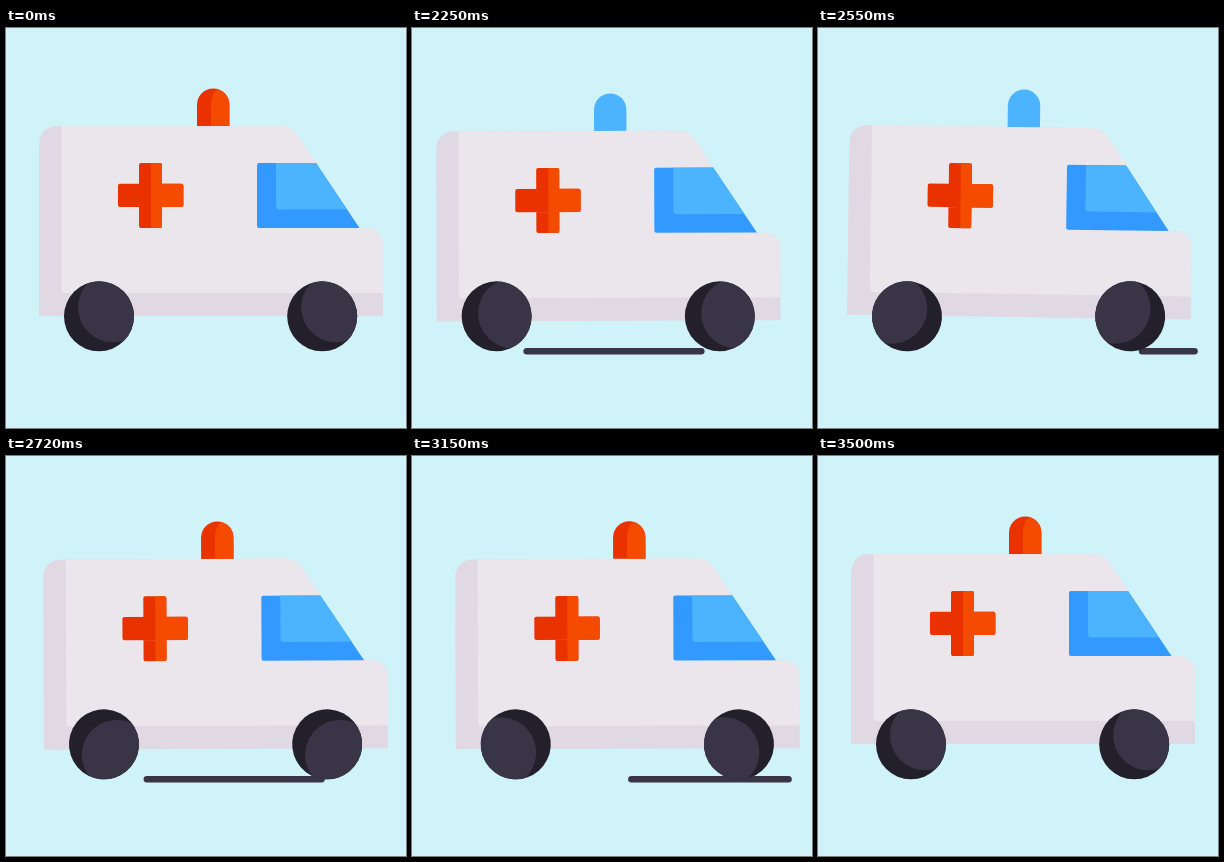
Animation, 400 px wide and 400 px high, one loop 3.52 s. Source, as an HTML page with a canvas:

```html
<!DOCTYPE html>
<html lang="en">
<head>
<meta charset="utf-8">
<title>Ambulance</title>
<style>
html, body { margin: 0; width: 100%; height: 100%; overflow: hidden; background: #d0f3f9; }
canvas { display: block; width: 100vw; height: 100vh; }
</style>
</head>
<body>
<canvas id="stage"></canvas>
<script>
const LOOP = 3520, START = 2000, DRIVE = 1500, BUMP = 500;
const COLOR = {
  sky: '#d0f3f9', body: '#eae6ec', shade: '#e0d9e4',
  red: '#e93200', orange: '#f44b00', blue: '#3199ff', sky2: '#4cb3ff',
  tyre: '#3a3546', tyreDark: '#231f2b'
};

const canvas = document.getElementById('stage');
const ctx = canvas.getContext('2d');

const clamp = v => Math.min(1, Math.max(0, v));
const smooth = p => p * p * (3 - 2 * p);

// Eased interpolation through [time, value] keys.
function track(keys, t) {
  for (let i = 1; i < keys.length; i++) {
    const [t0, a] = keys[i - 1], [t1, b] = keys[i];
    if (t < t1) return a + (b - a) * smooth(clamp((t - t0) / (t1 - t0)));
  }
  return keys[keys.length - 1][1];
}

const SHIFT = [[0, 0], [333, -9.9], [1000, 13.7], [1500, 0]];
const SPIN = [[133, 0], [1500, 1080]];
const DIP = [[0, 0], [167, 4.9], [333, 4.9], [500, 0]];
const TILT = [[0, 0], [83, 1.2], [167, -0.35], [333, 0], [417, -0.8], [500, 0]];

function fill(color, path) {
  ctx.fillStyle = color;
  ctx.fill(path);
}

function rounded(x, y, w, h, r) {
  const p = new Path2D();
  p.roundRect(x, y, w, h, r);
  return p;
}

function disc(x, y, r) {
  const p = new Path2D();
  p.arc(x, y, r, 0, Math.PI * 2);
  return p;
}

function clipped(path, draw) {
  ctx.save();
  ctx.clip(path);
  draw();
  ctx.restore();
}

const shell = new Path2D('M33 288V118Q33 98 53 98H273Q285 98 291 106L353 200H359Q377 200 377 218V288Z');
const glass = new Path2D('M253 135H310L353.5 200H253Q251 200 251 198V137Q251 135 253 135Z');
const glassLight = new Path2D('M270 135H310L341 181.5H273Q270 181.5 270 178.5Z');
const beacon = new Path2D('M191 98V76.7A16.2 16.2 0 0 1 223.4 76.7V98Z');
const beaconLight = new Path2D('M205 98V77Q205 66 212 60H224V98Z');
const cross = rounded(133, 135, 23, 65, 2);
cross.addPath(rounded(112, 155.7, 65.4, 23.3, 2));

function drawBody(blueLamp) {
  fill(COLOR.shade, shell);
  clipped(shell, () => fill(COLOR.body, rounded(55.5, 90, 330, 175, 3)));

  fill(COLOR.blue, glass);
  fill(COLOR.sky2, glassLight);

  fill(COLOR.red, cross);
  clipped(cross, () => fill(COLOR.orange, rounded(145, 130, 40, 80, 0)));

  fill(blueLamp ? COLOR.sky2 : COLOR.red, beacon);
  if (!blueLamp) clipped(beacon, () => fill(COLOR.orange, beaconLight));
}

function drawWheel(x, angle) {
  const tyre = disc(0, 0, 35);
  ctx.save();
  ctx.translate(x, 288.3);
  ctx.rotate(angle * Math.PI / 180);
  fill(COLOR.tyreDark, tyre);
  clipped(tyre, () => fill(COLOR.tyre, disc(14, -9, 35)));
  ctx.restore();
}

function drawRoadLine(t) {
  const at = p => 376.5 - 349 * clamp(p);
  const tip = at(t / 333.3), tail = at((t - 166.7) / 333.3);
  if (tail - tip < 0.5) return;
  ctx.strokeStyle = COLOR.tyre;
  ctx.lineWidth = 6.6;
  ctx.lineCap = 'round';
  ctx.beginPath();
  ctx.moveTo(tip, 323.3);
  ctx.lineTo(tail, 323.3);
  ctx.stroke();
}

// The picture steps 40 times a second, held for 20 and 30 ms in turn.
function stepTime(ms) {
  const rest = ms % 50;
  return ms - rest + (rest >= 20 ? 25 : 0);
}

function render(ms) {
  const scale = canvas.width / 400;
  ctx.setTransform(scale, 0, 0, canvas.height / 400, 0, 0);
  ctx.fillStyle = COLOR.sky;
  ctx.fillRect(0, 0, 400, 400);

  const elapsed = stepTime(ms) - START;
  const t = elapsed > 0 && elapsed < DRIVE ? elapsed : 0;
  const beat = t % BUMP;
  const dx = track(SHIFT, t);

  drawRoadLine(beat);

  ctx.save();
  ctx.translate(205 + dx, 288 + track(DIP, beat));
  ctx.rotate(track(TILT, beat) * Math.PI / 180);
  ctx.translate(-205, -288);
  drawBody(Math.floor(t * 6 / 1000) % 2 === 1);
  ctx.restore();

  const angle = track(SPIN, t);
  drawWheel(93 + dx, angle);
  drawWheel(316.2 + dx, angle);
}

function resize() {
  const ratio = window.devicePixelRatio || 1;
  canvas.width = Math.round(innerWidth * ratio);
  canvas.height = Math.round(innerHeight * ratio);
}

const origin = performance.now();
function frame() {
  render((performance.now() - origin) % LOOP);
  requestAnimationFrame(frame);
}

addEventListener('resize', resize);
resize();
frame();
</script>
</body>
</html>
```
